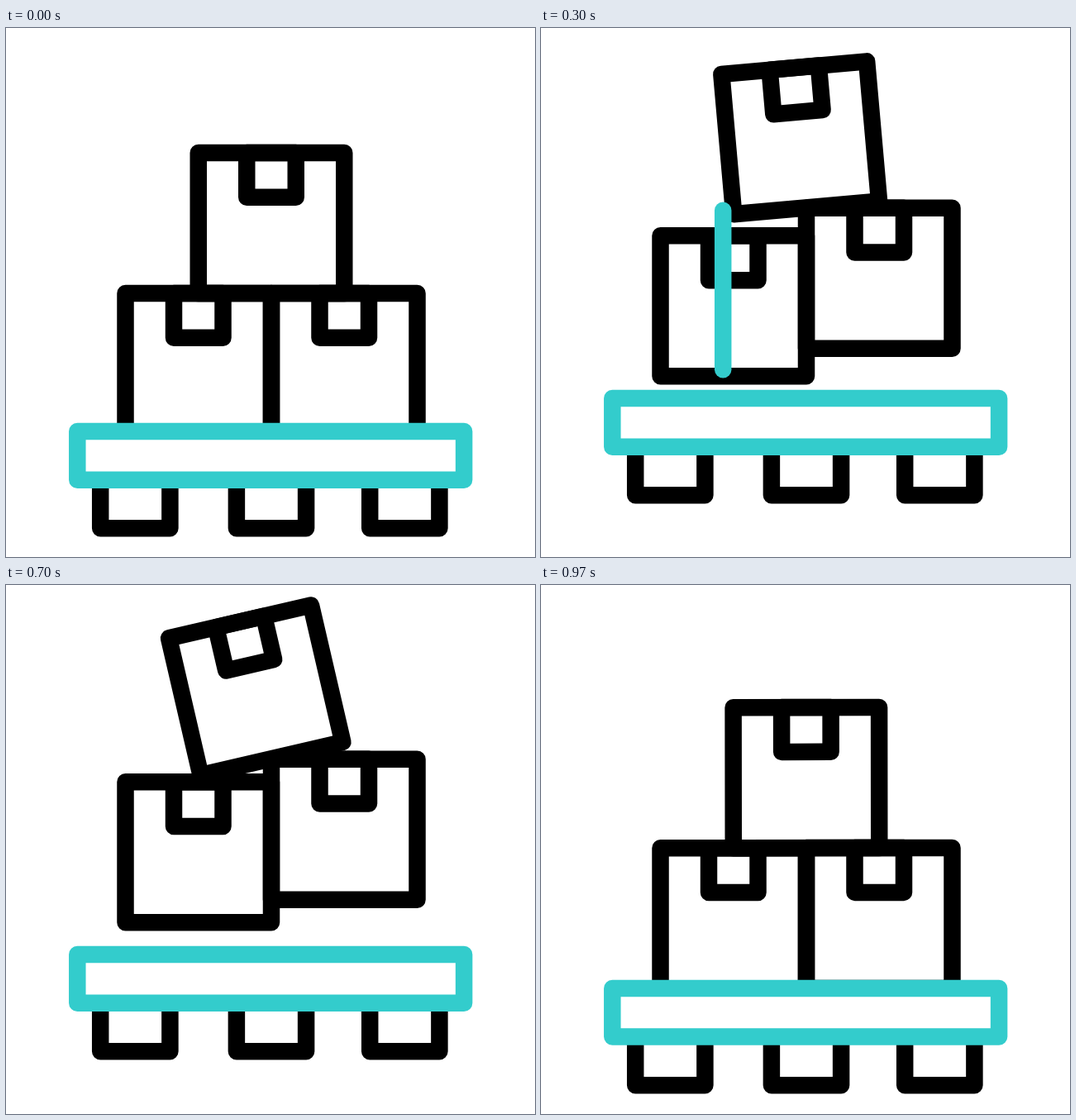
An HTML page with a canvas for the animation above (1670 ms loop, 640 by 640 pixels).

```html
<!DOCTYPE html>
<html lang="en">
<head>
<meta charset="utf-8">
<title>Boxes on a pallet</title>
<style>
html, body { margin: 0; width: 100%; height: 100%; overflow: hidden; background: #fff; }
canvas { display: block; width: 640px; height: 640px; }
</style>
</head>
<body>
<canvas id="stage" width="640" height="640"></canvas>
<script>
const ctx = document.getElementById('stage').getContext('2d');
const LOOP = 1670, LAST = 29;
const INK = '#000', TEAL = '#33cccc';
const BOX = { w: 176.5, h: 170, flapX: 58.5, flapW: 59.5, flapH: 53.8 };

// Eased progress of tick n through a span that begins at start
function ease(n, start, span) {
  const u = Math.min(1, Math.max(0, (n - start) / span));
  return u * u * (3 - 2 * u);
}

function box(x, y) {
  ctx.strokeStyle = INK;
  ctx.strokeRect(x, y, BOX.w, BOX.h);
  ctx.strokeRect(x + BOX.flapX, y, BOX.flapW, BOX.flapH);
}

function tiltedBox(lift, deg) {
  ctx.save();
  ctx.translate(321, 319 - lift - deg * 0.05);
  ctx.rotate(-deg * Math.PI / 180);
  box(-BOX.w / 2, 2 - BOX.h);
  ctx.restore();
}

function leg(x, y) {
  ctx.strokeStyle = INK;
  ctx.beginPath();
  ctx.moveTo(x, y);
  ctx.lineTo(x, y + 58.6);
  ctx.lineTo(x + 84.2, y + 58.6);
  ctx.lineTo(x + 84.2, y);
  ctx.stroke();
}

function pallet(lift) {
  const y = 488.1 - lift;
  for (const x of [114.2, 278.9, 440.2]) leg(x, y + 58.6);
  ctx.fillStyle = '#fff';
  ctx.strokeStyle = TEAL;
  ctx.fillRect(86.3, y, 467.8, 58.6);
  ctx.strokeRect(86.3, y, 467.8, 58.6);
}

// Rising streak: the tail follows the head four ticks later
function streak(n, x, y, start) {
  const head = ease(n, start, 6), tail = ease(n, start + 4, 6);
  if (head <= tail) return;
  ctx.strokeStyle = TEAL;
  ctx.beginPath();
  ctx.moveTo(x, y - 226 * tail);
  ctx.lineTo(x, y - 226 * head);
  ctx.stroke();
}

// Boxes settle slightly above their resting place
function boxLift(n, peak, start, span) {
  return peak * ease(n, start, span) - (peak - 2.1) * ease(n, 19.4, 10.1);
}

function draw(n) {
  ctx.clearRect(0, 0, 640, 640);
  ctx.lineWidth = 20.5;
  ctx.lineJoin = ctx.lineCap = 'round';

  const left = boxLift(n, 88.7, 2.23, 9.66);
  const right = boxLift(n, 118.1, 1.79, 9.26);
  const tilt = 17.3 * (ease(n, 5, 11.2) - ease(n, 17, 12.4));
  const base = 41 * (ease(n, 2.68, 6.96) - ease(n, 23.2, 6));

  box(144.5, 321 - left);
  box(321, 321 - right);
  tiltedBox(right, tilt);
  pallet(base);
  streak(n, 220.2, 430, 4);
  streak(n, 451.8, 324.5, 10);
}

// Thirty ticks per second, resting at both ends of the loop
function tick() {
  const t = performance.now() % LOOP;
  const n = Math.min(LAST, Math.floor(t * 0.03 + 0.11));
  draw(n < 3 ? 0 : n);
  requestAnimationFrame(tick);
}
tick();
</script>
</body>
</html>
```
